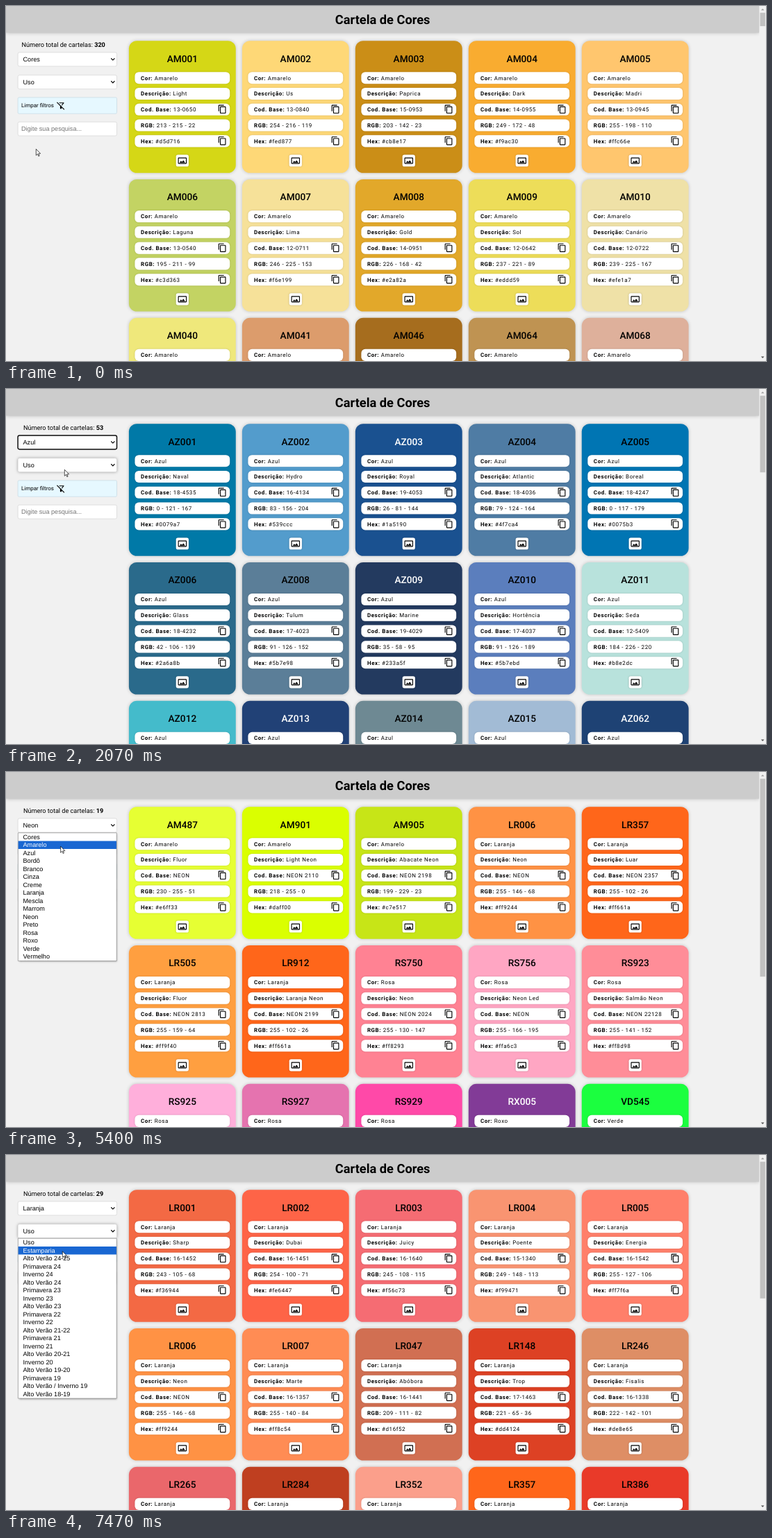
Recreate the animation shown at these times as an HTML page with a canvas. Size 1094 by 512 pixels, loop 8 s.

```html
<!DOCTYPE html>
<html lang="pt">
<head>
<meta charset="utf-8">
<title>Cartela de Cores</title>
<style>
html, body { margin: 0; width: 100%; height: 100%; overflow: hidden; background: #f1f1f1; }
canvas { display: block; width: 100%; height: 100%; }
</style>
</head>
<body>
<canvas id="stage"></canvas>
<script>
const W = 1094, H = 512, LOOP = 8000, FPS = 15;
const K = W / 1920;               // layout is in 1920-wide page pixels
const dpr = window.devicePixelRatio || 1;
const canvas = document.getElementById('stage');
canvas.width = W * dpr;
canvas.height = H * dpr;
const ctx = canvas.getContext('2d');

const ROBOTO = 'Roboto, sans-serif';
const ARIAL = '"Liberation Sans", Arial, sans-serif';
const FAMILY = { AM: 'Amarelo', AZ: 'Azul', LR: 'Laranja', RS: 'Rosa', RX: 'Roxo', VD: 'Verde' };

// code|hex|base|description
const parse = s => s.trim().split('\n').map(line => line.trim().split('|'));
const YELLOW = parse(`AM001|d5d716|13-0650|Light
  AM002|fed877|13-0840|Us
  AM003|cb8e17|15-0953|Paprica
  AM004|f9ac30|14-0955|Dark
  AM005|ffc66e|13-0945|Madri
  AM006|c3d363|13-0540|Laguna
  AM007|f6e199|12-0711|Lima
  AM008|e2a82a|14-0951|Gold
  AM009|eddd59|12-0642|Sol
  AM010|efe1a7|12-0722|Canário
  AM040|efe87b
  AM041|dc9c6c
  AM046|a66d1e
  AM064|bf9352
  AM068|deb09b`);
const BLUE = parse(`AZ001|0079a7|18-4535|Naval
  AZ002|539ccc|16-4134|Hydro
  AZ003|1a5190|19-4053|Royal
  AZ004|4f7ca4|18-4036|Atlantic
  AZ005|0075b3|18-4247|Boreal
  AZ006|2a6a8b|18-4232|Glass
  AZ008|5b7e98|17-4023|Tulum
  AZ009|233a5f|19-4029|Marine
  AZ010|5b7ebd|17-4037|Hortência
  AZ011|b8e2dc|12-5409|Seda
  AZ012|44bbcb
  AZ013|214176
  AZ014|6e8993
  AZ015|a2bbd5
  AZ062|1e4274`);
const NEON = parse(`AM487|e6ff33|NEON|Fluor
  AM901|daff00|NEON 2110|Light Neon
  AM905|c7e517|NEON 2198|Abacate Neon
  LR006|ff9244|NEON|Neon
  LR357|ff661a|NEON 2357|Luar
  LR505|ff9f40|NEON 2813|Fluor
  LR912|ff661a|NEON 2199|Laranja Neon
  RS750|ff8293|NEON 2024|Neon
  RS756|ffa6c3|NEON|Neon Led
  RS923|ff8d98|NEON 22128|Salmão Neon
  RS925|ffafdb
  RS927|e573af
  RS929|ff49a8
  RX005|823b97
  VD545|1bff3f`);
const ORANGE = parse(`LR001|f36944|16-1452|Sharp
  LR002|fe6447|16-1451|Dubai
  LR003|f56c73|16-1640|Juicy
  LR004|f99471|15-1340|Poente
  LR005|ff7f6a|16-1542|Energia
  LR006|ff9244|NEON|Neon
  LR007|ff8c54|16-1357|Marte
  LR047|d16f52|16-1441|Abóbora
  LR148|dd4124|17-1463|Trop
  LR246|de8e65|16-1338|Fisalis
  LR265|ea676b
  LR284|bf3f20
  LR352|fb9f8b
  LR357|ff661a
  LR386|e93a29`);

const COLORS = ('Cores,Amarelo,Azul,Bordô,Branco,Cinza,Creme,Laranja,Mescla,' +
  'Marrom,Neon,Preto,Rosa,Roxo,Verde,Vermelho').split(',');
const USES = ('Uso,Estamparia,Alto Verão 24-25,Primavera 24,Inverno 24,Alto Verão 24,' +
  'Primavera 23,Inverno 23,Alto Verão 23,Primavera 22,Inverno 22,Alto Verão 21-22,' +
  'Primavera 21,Inverno 21,Alto Verão 20-21,Inverno 20,Alto Verão 19-20,Primavera 19,' +
  'Alto Verão / Inverno 19,Alto Verão 18-19').split(',');

// Times are in ticks of 1/15 s
const PAGES = [
  { at: 0, color: 'Cores', total: 320, thumb: 51, cards: YELLOW },
  { at: 30, color: 'Azul', total: 53, thumb: 211, cards: BLUE },
  { at: 58, color: 'Neon', total: 19, thumb: 518, cards: NEON },
  { at: 95, color: 'Laranja', total: 29, thumb: 363, cards: ORANGE }
];
const MENUS = [
  { from: 15, to: 30, use: false },
  { from: 42, to: 58, use: false },
  { from: 73, to: 95, use: false },
  { from: 103, to: 120, use: true }
];
// first tick, last tick, x, y (stage pixels)
const MOVES = [
  [7, 12, 87, 77], [19, 22, 84, 116], [36, 39, 80, 78], [46, 53, 73, 209.5],
  [64, 72, 82, 83], [79, 87, 68, 175], [91, 92, 69, 178], [96, 102, 81, 109],
  [108, 112, 81, 138.5]
];
const ROW = 20.2, LEFT = 30, SIDE = 250;
const SELECT_Y = [135, 192.5];

const ICON = {
  copy: new Path2D('M16 1H4c-1.1 0-2 .9-2 2v14h2V3h12V1zm3 4H8c-1.1 0-2 .9-2 2v14c0 1.1.9 2 2 2h11c1.1 0 2-.9 2-2V7c0-1.1-.9-2-2-2zm0 16H8V7h11v14z'),
  image: new Path2D('M21 4H3c-1.1 0-2 .9-2 2v12c0 1.1.9 2 2 2h18c1.1 0 2-.9 2-2V6c0-1.1-.9-2-2-2zm0 14H3V6h18v12zm-6.5-7L11 15.51 8.5 12.5 5 17h14z'),
  noFilter: new Path2D('M16.95 6l-3.57 4.55 1.43 1.43c1.03-1.31 4.98-6.37 4.98-6.37C20.3 4.95 19.83 4 19 4H6.83l2 2h8.12zM2.81 2.81L1.39 4.22 10 13v6c0 .55.45 1 1 1h2c.55 0 1-.45 1-1v-2.17l5.78 5.78 1.41-1.41L2.81 2.81z'),
  arrow: new Path2D('M.5 .5V16.5L4.2 13L6.7 18.7L9 17.7L6.5 12.1H11.6Z')
};

function shadow(blur, alpha, dx = 0, dy = 0) {
  const s = K * dpr;
  ctx.shadowColor = `rgba(0,0,0,${alpha})`;
  ctx.shadowBlur = blur * s;
  ctx.shadowOffsetX = dx * s;
  ctx.shadowOffsetY = dy * s;
}
const noShadow = () => { ctx.shadowColor = 'transparent'; };

function box(x, y, w, h, r, fill, stroke, line = 1) {
  ctx.beginPath();
  ctx.roundRect(x, y, w, h, r);
  if (fill) { ctx.fillStyle = fill; ctx.fill(); }
  noShadow();
  if (stroke) { ctx.strokeStyle = stroke; ctx.lineWidth = line; ctx.stroke(); }
}

// Draws text with its capitals centred on cy; returns its width
function text(s, x, cy, size, { font = ROBOTO, weight = 400, color = '#000', gap = 0, align = 'left' } = {}) {
  ctx.font = `${weight} ${size}px ${font}`;
  ctx.letterSpacing = gap + 'px';
  ctx.textAlign = align;
  ctx.fillStyle = color;
  ctx.fillText(s, x, cy + size * 0.357);
  return ctx.measureText(s).width;
}

function icon(path, x, y) {
  ctx.save();
  ctx.translate(x, y);
  ctx.fillStyle = '#000';
  ctx.fill(path);
  ctx.restore();
}

function poly(fill, ...pts) {
  ctx.beginPath();
  for (const [x, y] of pts) ctx.lineTo(x, y);
  ctx.fillStyle = fill;
  ctx.fill();
}

function drawCard([code, hex, base = '', name = ''], x, y) {
  const rgb = [0, 2, 4].map(i => parseInt(hex.substr(i, 2), 16));
  const luma = 0.2126 * rgb[0] + 0.7152 * rgb[1] + 0.0722 * rgb[2];
  shadow(10, 0.2);
  box(x, y, 270, 334.6, 20, '#' + hex);
  text(code, x + 135, y + 44.8, 24, { weight: 500, align: 'center', color: luma < 83 ? '#fff' : '#000' });

  const fields = [
    ['Cor: ', FAMILY[code.slice(0, 2)]],
    ['Descrição: ', name],
    ['Cod. Base: ', base],
    ['RGB: ', rgb.join(' - ')],
    ['Hex: ', '#' + hex]
  ];
  fields.forEach(([label, value], i) => {
    const cy = y + 94 + i * 40;
    shadow(5, 0.15);
    box(x + 15, cy - 15, 240, 30, 10, '#fff');
    const w = text(label, x + 30, cy, 14, { weight: 700, gap: 1 });
    text(value, x + 30 + w, cy, 14, { gap: 1 });
    if (i === 2 || i === 4) icon(ICON.copy, x + 224, cy - 12.8);
  });
  shadow(5, 0.2);
  box(x + 119, y + 288.5, 32, 30, 5, '#fff');
  icon(ICON.image, x + 123, y + 291.5);
}

function drawSelect(label, cy, hot, ring) {
  if (hot) shadow(8, 0.35);
  box(LEFT, cy - 17.5, SIDE, 35, 4, '#fff', '#ccc');
  if (ring) box(LEFT, cy - 17.5, SIDE, 35, 4, null, '#101010', 2.6);
  text(label, 43, cy, 16, { font: ARIAL });
  ctx.beginPath();
  ctx.moveTo(265.5, cy - 2.5);
  ctx.lineTo(270, cy + 2);
  ctx.lineTo(274.5, cy - 2.5);
  ctx.strokeStyle = '#000';
  ctx.lineWidth = 2;
  ctx.stroke();
}

function drawMenu(items, top, picked) {
  shadow(5, 0.4, 2, 3);
  box(LEFT + 0.5, top, SIDE - 1, items.length * ROW + 1, 0, '#fff', '#767676');
  items.forEach((item, i) => {
    const y = top + 0.5 + i * ROW;
    const on = i === picked;
    if (on) box(LEFT + 1, y, SIDE - 2, ROW, 0, '#1967d2');
    text(item, 43, y + ROW / 2 - 0.8, 16, { font: ARIAL, color: on ? '#fff' : '#000' });
  });
}

function drawScrollbar(end) {
  ctx.fillStyle = '#f1f1f1';
  ctx.fillRect(1903, 0, 17, 900);
  ctx.fillStyle = '#c1c1c1';
  ctx.fillRect(1905, 17, 13, end - 17);
  poly('#a3a3a3', [1907.5, 11], [1911.5, 6.5], [1915.5, 11]);
  poly('#505050', [1907.5, 887], [1911.5, 891.5], [1915.5, 887]);
}

function drawCursor(x, y, beam) {
  ctx.save();
  ctx.translate(x, y);
  ctx.lineWidth = 1.2;
  ctx.strokeStyle = '#000';
  if (beam) {
    ctx.beginPath();
    for (const s of [-1, 1]) {
      ctx.moveTo(-3.5, 8 * s);
      ctx.quadraticCurveTo(0, 8 * s, 0, 6 * s);
      ctx.quadraticCurveTo(0, 8 * s, 3.5, 8 * s);
    }
    ctx.moveTo(0, -7);
    ctx.lineTo(0, 7);
    ctx.stroke();
  } else {
    ctx.fillStyle = '#fff';
    ctx.fill(ICON.arrow);
    ctx.stroke(ICON.arrow);
  }
  ctx.restore();
}

function cursorAt(tick) {
  let x = 43, y = 206;
  for (const [a, b, tx, ty] of MOVES) {
    const p = Math.min(1, Math.max(0, (tick - a + 1) / (b - a + 1)));
    const e = p * p * (3 - 2 * p);
    x += (tx - x) * e;
    y += (ty - y) * e;
  }
  return [x / K, y / K];
}

function draw(tick) {
  const page = PAGES.filter(p => p.at <= tick).pop();
  const menu = MENUS.find(m => tick >= m.from && tick < m.to);
  const [cx, cy] = cursorAt(tick);
  const inSide = cx > LEFT && cx < LEFT + SIDE;
  const over = y => inSide && Math.abs(cy - y) < 17.5;

  ctx.setTransform(K * dpr, 0, 0, K * dpr, 0, 0);
  ctx.textRendering = 'geometricPrecision';
  ctx.fillStyle = '#f1f1f1';
  ctx.fillRect(0, 0, 1920, 900);

  page.cards.forEach((card, i) =>
    drawCard(card, 310.5 + (i % 5) * 286, 88 + Math.floor(i / 5) * 350.7));

  shadow(10, 0.3);
  box(0, 0, 1903, 67.5, 0, '#ccc');
  text('Cartela de Cores', 951.5, 34, 32, { weight: 700, align: 'center' });

  const label = 'Número total de cartelas: ';
  ctx.letterSpacing = '0px';
  ctx.font = `400 16px ${ROBOTO}`;
  const w1 = ctx.measureText(label).width;
  ctx.font = `700 16px ${ROBOTO}`;
  const x0 = 145 - (w1 + ctx.measureText(page.total).width) / 2;
  text(label, x0, 97.5, 16);
  text(String(page.total), x0 + w1, 97.5, 16, { weight: 700 });

  drawSelect(page.color, SELECT_Y[0], over(SELECT_Y[0]), page.at > 0 && !menu);
  drawSelect('Uso', SELECT_Y[1], menu ? menu.use : over(SELECT_Y[1]), false);
  box(LEFT, 231.5, SIDE, 41, 3, '#e6f8ff', '#bcd3de');
  text('Limpar filtros', 38.5, 251, 14);
  icon(ICON.noFilter, 126.7, 240.2);
  box(LEFT, 293.5, SIDE, 35, 4, '#fff', '#ccc');
  text('Digite sua pesquisa...', 38.5, 310.8, 16, { font: ARIAL, color: '#757575' });

  if (menu) {
    const items = menu.use ? USES : COLORS;
    const top = menu.use ? 211 : 154;
    const row = Math.floor((cy - top) / ROW);
    drawMenu(items, top, row >= 0 ? row : Math.max(0, items.indexOf(page.color)));
  }
  drawScrollbar(page.thumb);

  const beam = !menu && over(311);
  drawCursor(cx, beam ? cy - 2 : cy, beam);
}

let last = -1;
function frame() {
  const t = performance.now() % LOOP;
  const tick = Math.floor((t + 4) * FPS / 1000) % 120;
  if (tick !== last) draw(last = tick);
  requestAnimationFrame(frame);
}
frame();
</script>
</body>
</html>
```
